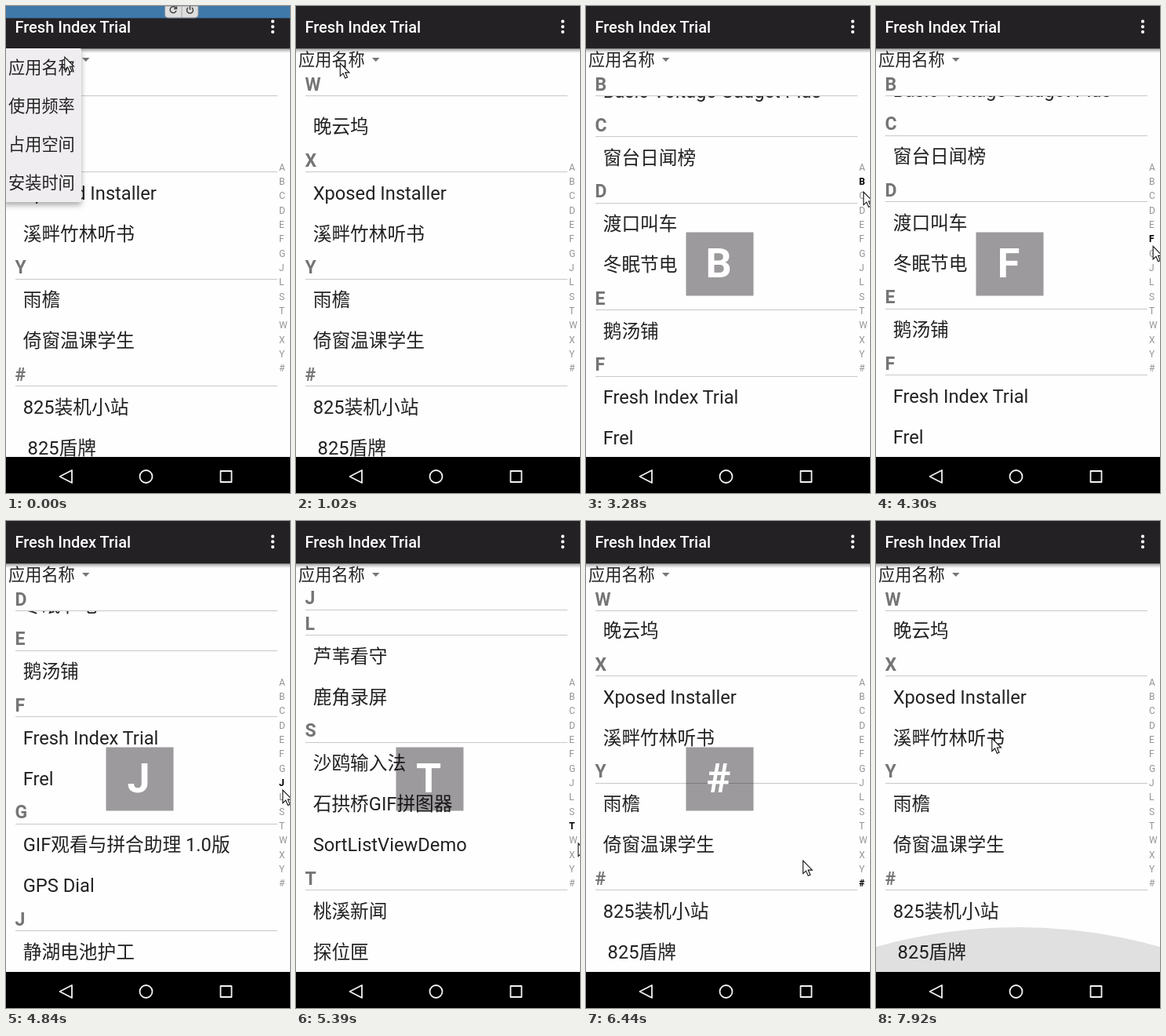
An HTML page that plays this animation: 362x621 px, repeating every 8000 ms.

```html
<!DOCTYPE html>
<html lang="zh-CN">
<head>
<meta charset="utf-8">
<title>Indexed list</title>
<style>
html, body { margin: 0; width: 100%; height: 100%; overflow: hidden; background: #fefefe; }
svg { display: block; width: 362px; height: 621px; }
text { font-family: Roboto, 'Noto Sans CJK SC', 'Noto Sans CJK', sans-serif; fill: #222; white-space: pre; }
.row { font-size: 23.7px; }
.head { font-size: 23px; font-weight: 700; fill: #757575; }
.rule { stroke: #c9c8c9; shape-rendering: crispEdges; }
.label { font-size: 21.2px; }
.index { font-size: 12px; fill: #979597; }
.index.on { font-weight: 700; fill: #000; }
.light { fill: #fff; }
.nav { fill: none; stroke: #f2f2f2; stroke-width: 1.8; stroke-linejoin: round; }
</style>
</head>
<body>
<svg viewBox="0 0 362 621">
  <defs>
    <clipPath id="view"><rect y="82" width="362" height="493"/></clipPath>
    <linearGradient id="fade" x2="0" y2="1">
      <stop stop-opacity=".38"/><stop offset="1" stop-opacity="0"/>
    </linearGradient>
    <filter id="soft" x="-20%" y="-10%" width="150%" height="130%">
      <feDropShadow dx="0" dy="4" stdDeviation="3.5" flood-opacity=".32"/>
    </filter>
  </defs>
  <rect width="362" height="621" fill="#fefefe"/>
  <g clip-path="url(#view)">
    <g id="list"></g>
    <g id="sticky">
      <rect y="-33" width="362" height="33" fill="#fefefe"/>
      <text class="head" x="11.5" y="-7"></text>
      <path class="rule" d="M11.5 0H346"/>
    </g>
    <circle id="glow" cx="181" r="667" fill="#080008" opacity=".118"/>
  </g>
  <rect y="54" width="362" height="28" fill="#fefefe"/>
  <text class="label" x="3" y="76">应用名称</text>
  <path d="M97 66h9.5l-4.75 5z" fill="#757575"/>
  <g id="indexBar"></g>
  <g id="bubble">
    <rect x="127.5" y="288.5" width="86" height="81" fill="#0a030a" opacity=".4"/>
    <text class="light" x="169" y="346" font-size="52" font-weight="700" text-anchor="middle"></text>
  </g>
  <rect y="54" width="362" height="6" fill="url(#fade)"/>
  <rect width="362" height="54.3" fill="#242124"/>
  <text class="light" x="11.5" y="34" font-size="20" font-weight="500">Fresh Index Trial</text>
  <g class="light">
    <circle cx="340" cy="19.7" r="2.1"/><circle cx="340" cy="26.4" r="2.1"/><circle cx="340" cy="33.100" r="2.1"/>
  </g>
  <g id="popup">
    <rect x="-4" y="54" width="100" height="196" rx="2" fill="#f0edf0" filter="url(#soft)"/>
  </g>
  <g id="strip">
    <rect width="362" height="15.5" fill="#3f79aa"/>
    <path d="M202.5 0V11q0 4 4 4H241q4 0 4-4V0z" fill="#dedede" stroke="#8d9297"/>
    <path d="M224 0V15" stroke="#a5a5a5"/>
    <g fill="none" stroke="#444" stroke-width="1.5">
      <path d="M216.5 2.5A4 4 0 1 0 217 6M217.5 .5V3.5H214"/>
      <path d="M232 2.2A4 4 0 1 0 237 2.2M234.5 0V5"/>
    </g>
  </g>
  <rect y="575" width="362" height="46"/>
  <path class="nav" d="M68.5 600L84 592V608Z"/>
  <circle class="nav" cx="178.5" cy="600" r="8"/>
  <rect class="nav" x="273.5" y="593" width="14" height="14"/>
  <path id="cursor" d="M.8 0V16.5L4.600 13L7.300 19.300L10 18.200L7.300 12H12.500Z" fill="#fff" stroke="#111" stroke-width="1.1"/>
</svg>
<script>
const LOOP = 8000, HEAD = 32.5, ROW = 52, TOP = 114.5, BOTTOM = 574.5;
const PRESS = 3280, LEAVE = 5980, RELEASE = 6850, PULL = 7560;
const LETTERS = 'ABCDEFGJLSTWXY#';
const SECTIONS = {
  B: ['Basic Voltage Gadget Plus'],
  C: ['窗台日闻榜'],
  D: ['渡口叫车', '冬眠节电'],
  E: ['鹅汤铺'],
  F: ['Fresh Index Trial', 'Frel'],
  G: ['GIF观看与拼合助理 1.0版', 'GPS Dial'],
  J: ['静湖电池护工'],
  L: ['芦苇看守', '鹿角录屏'],
  S: ['沙鸥输入法', '石拱桥GIF拼图器', 'SortListViewDemo'],
  T: ['桃溪新闻', '探位匣'],
  W: ['晚云坞'],
  X: ['Xposed Installer', '溪畔竹林听书'],
  Y: ['雨檐', '倚窗温课学生'],
  '#': ['825装机小站', ' 825盾牌']
};

// Pointer path: [time, x, y]
const PATH = [
  [280, 74, 65], [1320, 48, 76], [1740, 95, 182], [2130, 215, 243],
  [2400, 334, 209], [2820, 350, 204], [PRESS, 350, 204], [PRESS, 353, 237],
  [4840, 352, 343], [5390, 359, 411], [LEAVE, 353, 474], [6440, 276, 433],
  [7540, 152, 516], [7920, 147, 277]
];

const $ = id => document.getElementById(id);
const clamp = (v, lo, hi) => Math.max(lo, Math.min(hi, v));
const mix = (a, b, p) => a + (b - a) * p;
const move = (el, x, y) => el.setAttribute('transform', `translate(${x} ${y})`);
const show = (el, on) => el.setAttribute('visibility', on ? 'visible' : 'hidden');

function add(parent, tag, attrs, text = '') {
  const el = document.createElementNS('http://www.w3.org/2000/svg', tag);
  for (const name in attrs) el.setAttribute(name, attrs[name]);
  el.textContent = text;
  return parent.appendChild(el);
}

function pointerAt(t) {
  const i = PATH.findIndex(k => k[0] > t);
  if (i < 1) return PATH[i ? PATH.length - 1 : 0].slice(1);
  const [t0, x0, y0] = PATH[i - 1], [t1, x1, y1] = PATH[i];
  const p = (t - t0) / (t1 - t0);
  return [mix(x0, x1, p), mix(y0, y1, p)];
}

// Each section keeps the y of its line and the scroll that brings its end into view
const sections = [];
let line = -HEAD - ROW;
for (const letter of LETTERS.slice(1)) {
  const names = SECTIONS[letter];
  const head = add($('list'), 'g', {});
  add(head, 'text', { class: 'head', x: 11.5, y: line - 7 }, letter);
  add(head, 'path', { class: 'rule', d: `M11.5 ${line}H346` });
  names.forEach((name, i) =>
    add($('list'), 'text', { class: 'row', x: 21.7, y: line + 35.2 + i * ROW }, name));
  sections.push({ letter, line, head, reach: line + names.length * ROW - BOTTOM });
  line += HEAD + ROW * names.length;
}
const minScroll = sections[0].line - TOP + HEAD;
const maxScroll = sections[sections.length - 1].reach;

const marks = [...LETTERS].map((letter, i) =>
  add($('indexBar'), 'text', { class: 'index', x: 348, y: 209.8 + i * 18.32 }, letter));

['应用名称', '使用频率', '占用空间', '安装时间'].forEach((name, i) =>
  add($('popup'), 'text', { class: 'label', x: 3, y: 86 + i * 49 }, name));

// The list glides to a newly picked section, moving only as far as needed
function scrollFor(pick) {
  const i = Math.floor(pick);
  const reach = n => clamp(sections[Math.max(n - 1, 0)].reach, minScroll, maxScroll);
  return mix(reach(i - 1), reach(i), Math.min(1, (pick - i) * 5));
}

function drawList(offset) {
  move($('list'), 0, -offset);
  const top = sections.filter(s => s.line - offset <= TOP + HEAD / 2).length - 1;
  sections.forEach((s, i) => show(s.head, i !== top));
  const next = sections[top + 1];
  move($('sticky'), 0, next ? Math.min(TOP, next.line - offset - HEAD) : TOP);
  $('sticky').querySelector('text').textContent = sections[top].letter;
}

function drawIndex(picked, on) {
  marks.forEach((m, i) => m.setAttribute('class', on && i === picked ? 'index on' : 'index'));
  show($('bubble'), on);
  $('bubble').querySelector('text').textContent = LETTERS[picked];
}

function draw(t) {
  const [x, y] = pointerAt(t);
  move($('cursor'), x, y);

  const end = LETTERS.length - .01;
  const pick = t < LEAVE ? clamp((y - 210.4) / 18.3, 0, end) : end;
  drawList(t < PRESS ? maxScroll - 14 : scrollFor(pick));
  drawIndex(Math.floor(pick), t >= PRESS && t < RELEASE);

  show($('popup'), t < 1000);
  move($('strip'), 0, -17 * clamp((t - 280) / 450, 0, 1));

  const pull = clamp((t - PULL) / 360, 0, 1);
  show($('glow'), pull > 0);
  $('glow').setAttribute('cy', 575 + 667 - 57 * pull);
}

const start = performance.now();
function tick() {
  draw((performance.now() - start) % LOOP);
  requestAnimationFrame(tick);
}
tick();
</script>
</body>
</html>
```
